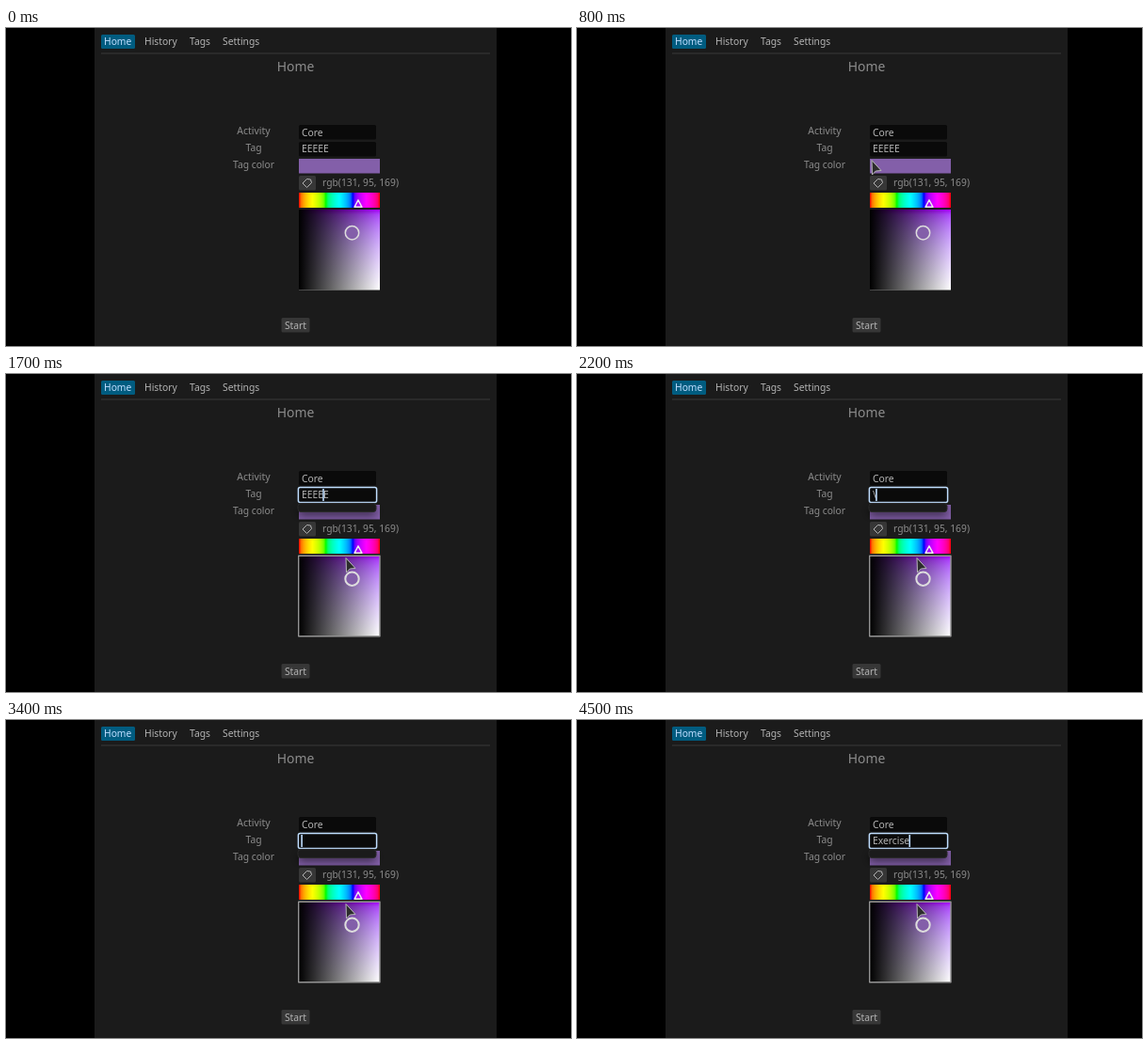
These frames come from a looping animation (600x338 px, 5 s). An HTML page with a canvas:

```html
<!DOCTYPE html>
<html lang="en">
<head>
<meta charset="utf-8">
<style>
html, body { margin: 0; width: 100%; height: 100%; overflow: hidden; background: #000; }
canvas { display: block; }
</style>
</head>
<body>
<canvas id="stage" width="600" height="338"></canvas>
<script>
const ctx = document.getElementById('stage').getContext('2d');
const LOOP = 5000, STEP = 100;
const GREY = '#8c8c8c', LIGHT = '#b4b4b4', FOCUS = '#c0deff', PANEL = '#1b1b1b', TAG = '#835fa9';

// [time, x, y] of the pointer tip; it is hidden before the first key
const pointerKeys = [[100, 262, 85], [500, 219, 138], [600, 219, 138], [800, 313, 140],
  [1000, 340, 128], [1500, 340, 128], [1700, 361, 195], [LOOP, 361, 195]];

// [time, content of the tag field]
const typed = [[0, 'EEEEE'], [1900, 'EEE'], [2000, 'EE'], [2100, 'E'], [2200, '\\'], [2800, ''],
  [3500, 'E'], [3600, 'Ex'], [3800, 'Exe'], [3900, 'Exer'], [4000, 'Exerc'],
  [4200, 'Exerci'], [4300, 'Exercis'], [4400, 'Exercise']];

const gamma = c => c <= 0.0031308 ? 12.92 * c : 1.055 * c ** (1 / 2.4) - 0.055;
const toRgb = linear => `rgb(${linear.map(c => Math.round(255 * gamma(c)))})`;
const clamp = v => Math.max(0, Math.min(1, v));
const hueLinear = h => [0, 4, 2].map(k => clamp(Math.abs((h * 6 + k) % 6 - 3) - 1));

function gradient(x0, y0, x1, y1, count, colorAt) {
  const g = ctx.createLinearGradient(x0, y0, x1, y1);
  for (let i = 0; i <= count; i++) g.addColorStop(i / count, colorAt(i / count));
  return g;
}
const pickerHue = hueLinear(0.733);
const hueFill = gradient(311, 0, 397, 0, 36, h => toRgb(hueLinear(h)));
const saturationFill = gradient(0, 193, 0, 278.5, 16,
  y => toRgb(pickerHue.map(c => 1 - (1 - y) * (1 - c))));
const valueFill = gradient(311, 0, 397, 0, 1, x => `rgba(0,0,0,${1 - x})`);

function box(x, y, w, h, fill, stroke, radius = 1.5, line = 1) {
  ctx.beginPath();
  ctx.roundRect(x, y, w, h, radius);
  if (fill) { ctx.fillStyle = fill; ctx.fill(); }
  if (stroke) { ctx.strokeStyle = stroke; ctx.lineWidth = line; ctx.stroke(); }
}

function text(str, x, y, color = GREY, size = 10.3, align = 'left') {
  ctx.font = `${size}px "Noto Sans", sans-serif`;
  ctx.textAlign = align;
  ctx.fillStyle = color;
  ctx.fillText(str, x, y);
}

function polygon(points, fill, stroke, line = 1) {
  ctx.beginPath();
  points.forEach(([x, y]) => ctx.lineTo(x, y));
  ctx.closePath();
  ctx.lineJoin = 'round';
  if (fill) { ctx.fillStyle = fill; ctx.fill(); }
  ctx.strokeStyle = stroke;
  ctx.lineWidth = line;
  ctx.stroke();
}

function popup(x, y, w, h, stroke) {
  ctx.save();
  ctx.shadowColor = 'rgba(0,0,0,.6)';
  ctx.shadowBlur = 10;
  ctx.shadowOffsetY = 4;
  box(x, y, w, h, PANEL, null, 3);
  ctx.restore();
  box(x, y, w, h, null, stroke, 3);
}

function pointerAt(t) {
  const i = pointerKeys.findIndex(k => k[0] > t);
  if (i < 1) return null;
  const [t0, x0, y0] = pointerKeys[i - 1], [t1, x1, y1] = pointerKeys[i];
  const p = (t - t0) / (t1 - t0);
  return [x0 + (x1 - x0) * p, y0 + (y1 - y0) * p];
}

function drawHeader() {
  box(101, 7, 36, 15, '#005c80');
  text('Home', 104, 17.5, FOCUS);
  text('History', 147, 17.5, LIGHT);
  text('Tags', 195, 17.5, LIGHT);
  text('Settings', 230, 17.5, LIGHT);
  box(101, 26.5, 413, 1, '#3a3a3a', null, 0);
  text('Home', 307.5, 46, GREY, 13.9, 'center');
}

function drawPicker(hovered) {
  box(311, 139, 86, 15.5, TAG, null, 0);
  box(311, 157, 18, 15.5, '#373737');
  polygon([[315, 165], [319.5, 160.5], [323.5, 161], [324.5, 164.5], [319.5, 169.5]], null, LIGHT);
  text('rgb(131, 95, 169)', 336, 168);

  box(311, 175, 86, 16, hueFill, null, 0);
  polygon([[374, 182.8], [378, 190.3], [370, 190.3]], toRgb(pickerHue), '#eee', 1.4);

  box(311, 193, 86, 85.5, saturationFill, null, 0);
  box(311, 193, 86, 85.5, valueFill, null, 0);
  if (hovered) box(310.7, 193.2, 86.3, 85.6, null, '#949494', 0, 1.4);
  ctx.beginPath();
  ctx.arc(367.5, 217.7, 7.2, 0, 2 * Math.PI);
  ctx.fillStyle = TAG;
  ctx.fill();
  ctx.strokeStyle = '#ddd';
  ctx.lineWidth = hovered ? 2 : 1.5;
  ctx.stroke();
}

function drawField(t, focused) {
  const value = typed.filter(k => k[0] <= t).pop()[1];
  box(311, 121, 82, 15.5, '#0a0a0a');
  if (focused) box(310.4, 120.6, 83.2, 16, null, FOCUS, 2, 1.5);
  else if (t >= 1000) box(310.7, 120.7, 82.6, 16, null, '#949494', 2);
  text(value, 314, 132, LIGHT);
  if (focused) {
    const before = t < 1900 ? value.slice(0, 4) : value;
    ctx.fillStyle = FOCUS;
    ctx.fillRect(313.3 + ctx.measureText(before).width, 122, 1.6, 13);
  }
}

function drawPointer([x, y], beam) {
  ctx.save();
  ctx.translate(x, y);
  if (beam) {
    ctx.fillStyle = '#ddd';
    ctx.fillRect(-0.7, -6, 1.4, 12);
    ctx.fillRect(-2.5, -6.5, 5, 1.2);
    ctx.fillRect(-2.5, 5.3, 5, 1.2);
  } else {
    polygon([[0, 0.5], [0.5, 16], [4.3, 12], [10, 11.5]], '#2c2c2c', '#b8b8b8');
  }
  ctx.restore();
}

function draw(t) {
  const focused = t >= 1300, pointer = pointerAt(t);
  box(0, 0, 600, 338, '#000', null, 0);
  box(94, 0, 427, 338, PANEL, null, 0);
  drawHeader();

  text('Activity', 263, 112.5, GREY, 10.5, 'center');
  text('Tag', 263, 130.5, GREY, 10.3, 'center');
  text('Tag color', 263, 148.5, GREY, 10.3, 'center');
  box(311, 103, 82, 15.5, '#0a0a0a');
  text('Core', 314, 114.5, LIGHT);
  drawPicker(t >= 1700);
  drawField(t, focused);
  box(292.5, 308, 30, 15.5, '#373737');
  text('Start', 307.5, 319.5, LIGHT, 10.3, 'center');

  if (focused) popup(310, 137.5, 83, 9, '#2a2a2a');
  if (t >= 1200 && t < 1600) {
    popup(309.5, 139.5, 181, 22.5, '#3c3c3c');
    text('What category is this activity under?', 314, 154.5, GREY, 10.2);
  }
  if (pointer) drawPointer(pointer, t >= 1000 && t < 1600);
}

function frame() {
  draw(Math.floor(performance.now() % LOOP / STEP) * STEP);
  requestAnimationFrame(frame);
}
frame();
</script>
</body>
</html>
```
